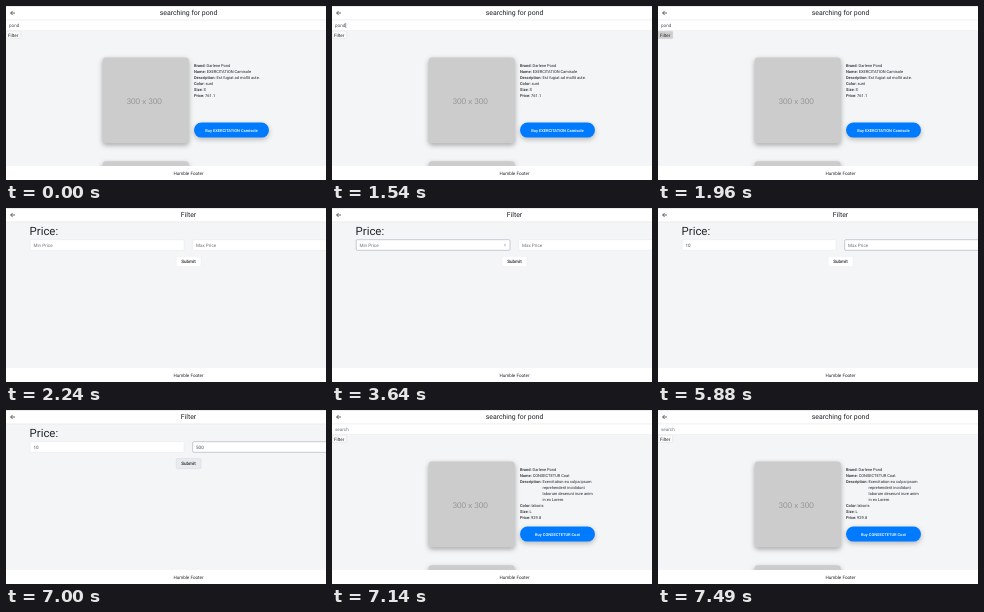
Animation of 320x174 px, one loop 8000 ms. Source, as an HTML page:

```html
<!DOCTYPE html>
<html lang="en">
<head>
<meta charset="utf-8">
<title>Shop filter</title>
<style>
  html, body { margin: 0; width: 100%; height: 100%; overflow: hidden; background: #f4f5f7; }
  svg { display: block; width: 100vw; height: 100vh; }
  text { font: 4.57px Roboto, Arial, sans-serif; fill: #212529; text-rendering: geometricPrecision; white-space: pre; }
  .mid { text-anchor: middle; }
  .title { font-size: 6.9px; }
  .head { font-size: 11.4px; }
  .info { font-size: 4px; }
  .bold { font-weight: 500; }
  .buy { font-size: 4px; font-weight: 500; fill: #fff; }
  .size { font: 7.9px Lato, Arial, sans-serif; fill: #969696; }
  .value { fill: #495057; }
  .value.empty { fill: #6c757d; }
  .field { fill: #fff; stroke: #dde1e6; stroke-width: .35; }
  .field.focus { stroke: #a3aabc; stroke-width: .6; }
  .card { fill: #ccc; filter: drop-shadow(0 2px 2.5px rgba(0, 0, 0, .32)); }
  .pill { fill: #007bff; filter: drop-shadow(0 2px 2.5px rgba(0, 0, 0, .25)); }
  .filter { fill: #fafafa; stroke: #dcdcdc; stroke-width: .4; }
  .filter.down { fill: #cfcfcf; stroke: #c4c4c4; }
  .submit { fill: #fff; stroke: #e6e8eb; stroke-width: .35; }
  .submit.down { fill: #e9ebee; stroke: #c9cdd2; }
</style>
</head>
<body>
<svg viewBox="0 0 320 174" preserveAspectRatio="none">
  <rect width="320" height="174" fill="#f4f5f7"/>

  <g id="results">
    <rect y="14" width="320" height="10.4" fill="#fff"/>
    <rect y="24.2" width="320" height=".4" fill="#e3e5e8"/>
    <text id="query" class="value" x="3" y="20.8"></text>
    <rect id="queryCaret" x="13.6" y="16.9" width=".5" height="5" fill="#333"/>
    <rect id="filterBtn" class="filter" x=".2" y="25.2" width="14.5" height="7.4" rx=".8"/>
    <text x="2" y="30.5">Filter</text>
    <rect class="card" x="96.6" y="51.6" width="86.2" height="85.6" rx="3.4"/>
    <text class="size mid" x="138.2" y="97.6">300 x 300</text>
    <rect class="card" x="96.6" y="155.2" width="86.2" height="85.6" rx="3.4"/>
    <g id="info"></g>
    <rect class="pill" x="188" y="116.6" width="75" height="15" rx="7.5"/>
    <text id="buy" class="buy mid" x="225.5" y="125.5"></text>
  </g>

  <g id="form">
    <text class="head" x="23.6" y="26.8">Price:</text>
    <rect id="minBox" class="field" x="24.2" y="31.7" width="153.8" height="10.6" rx="1.1"/>
    <rect id="maxBox" class="field" x="186.7" y="31.7" width="153.8" height="10.6" rx="1.1"/>
    <text id="min" class="value" x="27.5" y="38.7"></text>
    <text id="max" class="value" x="190" y="38.7"></text>
    <path id="spin" d="M172.2 36.7l.8-1 .8 1zM172.2 37.5l.8 1 .8-1z" fill="#8a8a8a"/>
    <rect id="caret" y="34.4" width=".5" height="5.2" fill="#333"/>
    <rect id="submitBtn" class="submit" x="170.2" y="48.6" width="24.8" height="10" rx="1.1"/>
    <text class="mid bold" x="182.5" y="55.2">Submit</text>
  </g>

  <rect width="320" height="14" fill="#fff"/>
  <rect width="320" height=".5" fill="#d4d4d4"/>
  <rect y="13.7" width="320" height=".5" fill="#dcdee1"/>
  <path d="M9 7H4.7M6.7 4.9L4.6 7l2.1 2.1" fill="none" stroke="#333" stroke-width=".75"/>
  <text id="title" class="title mid" x="182.5" y="9.4"></text>
  <rect y="160" width="320" height="14" fill="#fff"/>
  <text class="mid" x="182.5" y="168.9">Humble Footer</text>
</svg>

<script>
const LOOP = 8000;
const $ = id => document.getElementById(id);

const products = [
  { name: 'EXERCITATION Camisole', about: ['Est fugiat ad mollit aute.'], color: 'sunt', size: 'S', price: '761.1' },
  { name: 'CONSECTETUR Coat',
    about: ['Exercitation eu culpa ipsum', 'reprehenderit incididunt', 'laborum deserunt irure anim', 'in ex Lorem.'],
    color: 'laboris', size: 'L', price: '929.8' }
];

const start = {
  page: 'results', item: 0, query: 'pond', queryCaret: false, filterDown: false,
  min: '', max: '', focus: '', caret: '', spin: false, submitDown: false
};

// [time in ms, changed state]
const steps = [
  [0, {}],
  [1540, { queryCaret: true }],
  [1960, { queryCaret: false, filterDown: true }],
  [2240, { page: 'form', filterDown: false }],
  [2940, { spin: true }],
  [3150, { caret: 'min' }],
  [3290, { focus: 'min' }],
  [3640, { caret: '' }],
  [4200, { caret: 'min' }],
  [4480, { min: '1' }],
  [4550, { min: '10' }],
  [5110, { caret: '' }],
  [5320, { focus: 'max', spin: false }],
  [5390, { caret: 'max' }],
  [5880, { caret: '' }],
  [6160, { max: '5', caret: 'max' }],
  [6230, { max: '50' }],
  [6370, { max: '500' }],
  [6930, { caret: '' }],
  [7000, { submitDown: true }],
  [7140, { page: 'results', item: 1, query: '' }]
];

let state = start;
const timeline = steps.map(([at, change]) => ({ at, state: state = { ...state, ...change } }));

function show(id, on) { $(id).style.display = on ? '' : 'none'; }

function setValue(id, value, hint) {
  $(id).textContent = value || hint;
  $(id).classList.toggle('empty', !value);
}

function addText(x, y, text, cls) {
  const el = document.createElementNS('http://www.w3.org/2000/svg', 'text');
  el.setAttribute('x', x);
  el.setAttribute('y', y);
  el.setAttribute('class', 'info ' + cls);
  el.textContent = text;
  $('info').append(el);
}

function drawProduct(p) {
  const rows = [
    ['Brand:', 12.5, ['Darlene Pond']], ['Name:', 12.7, [p.name]], ['Description:', 22.6, p.about],
    ['Color:', 11.4, [p.color]], ['Size:', 9.4, [p.size]], ['Price:', 11.1, [p.price]]
  ];
  let y = 61;
  $('info').replaceChildren();
  for (const [label, indent, lines] of rows) {
    addText(188, y, label, 'bold');
    for (const line of lines) {
      addText(188 + indent, y, line, '');
      y += 6;
    }
  }
  $('buy').textContent = 'Buy ' + p.name;
}

function draw(s) {
  const results = s.page === 'results';
  show('results', results);
  show('form', !results);
  $('title').textContent = results ? 'searching for pond' : 'Filter';
  setValue('query', s.query, 'search');
  show('queryCaret', s.queryCaret);
  $('filterBtn').classList.toggle('down', s.filterDown);
  drawProduct(products[s.item]);

  setValue('min', s.min, 'Min Price');
  setValue('max', s.max, 'Max Price');
  for (const id of ['min', 'max']) $(id + 'Box').classList.toggle('focus', s.focus === id);
  show('spin', s.spin);
  show('caret', s.caret);
  if (s.caret) {
    const left = s.caret === 'min' ? 27.5 : 190;
    $('caret').setAttribute('x', left + s[s.caret].length * 2.57);
  }
  $('submitBtn').classList.toggle('down', s.submitDown);
}

const t0 = performance.now();
let current;

function tick() {
  const t = (performance.now() - t0) % LOOP;
  const step = timeline.findLast(s => s.at <= t);
  if (step !== current) draw((current = step).state);
  requestAnimationFrame(tick);
}
tick();
</script>
</body>
</html>
```
